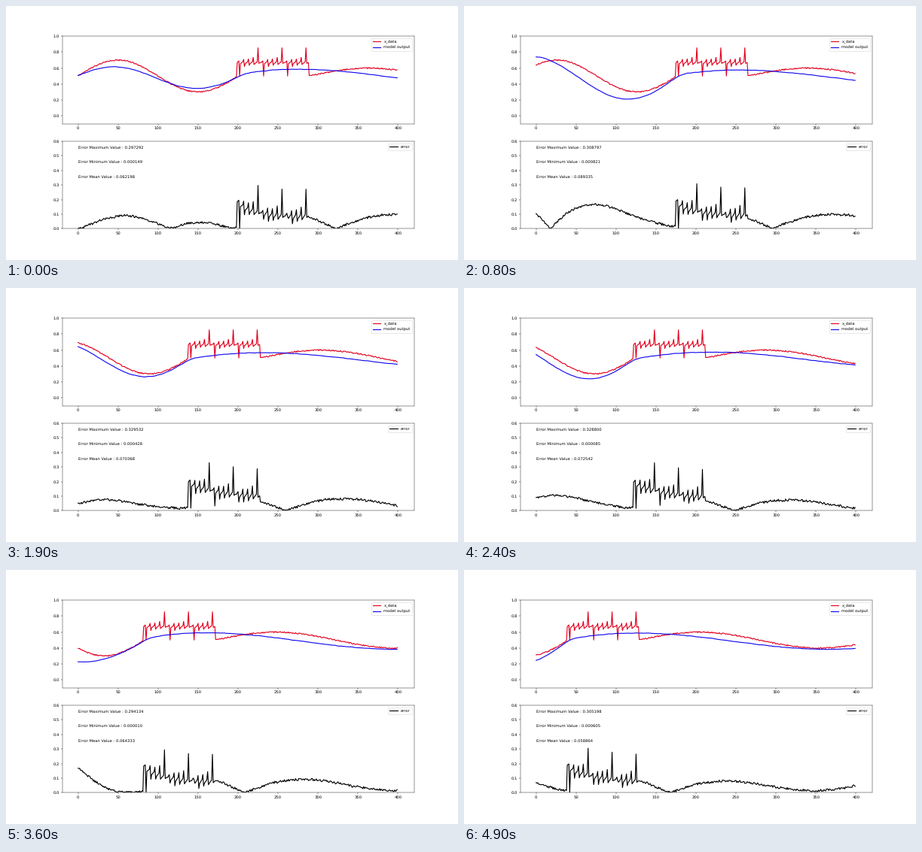
A matplotlib script for the animation above (5 s loop, 600 by 338 pixels).

```python
import numpy as np
import matplotlib.pyplot as plt
from matplotlib.animation import FuncAnimation

FRAMES, INTERVAL = 50, 100
WINDOW, LENGTH = 400, 564
WIDTH, HEIGHT, DPI = 600, 338, 37.5

plt.rcParams.update({"font.family": "DejaVu Sans", "font.size": 10.1,
                     "text.hinting": "none"})

# Key poses of the model: frame, wave swing, wave lead, hill centre, hill height
POSES = np.array([
    [0, .135, 2, 272, .587],
    [8, .270, 11, 275, .577],
    [19, .215, 5, 292, .568],
    [29, .265, 9, 300, .583],
    [36, .255, 21, 275, .592],
    [44, .265, 11, 285, .598],
    [49, .275, 11, 285, .588],
])


def make_signal():
    """Sine wave, a jagged burst, then a slower sine wave."""
    n = np.arange(LENGTH)
    signal = np.where(n < 289, 0.5 + 0.2 * np.sin(2 * np.pi * n / 200),
                      0.5 + 0.1 * np.sin(2 * np.pi * (n - 289) / 300))
    signal += np.random.default_rng(4).uniform(-0.008, 0.008, LENGTH)

    teeth = [(.50, .71), (.62, .715), (.635, .735), (.645, .855)]
    burst = [.67, .68, .69]
    for dip, peak in teeth:
        burst += [dip, *np.linspace(.655, .68, 4), peak]
    burst += [.66, .665, .67]
    signal[199:289] = np.tile(burst, 3)
    return signal


SIGNAL = make_signal()


def model_output(frame, n):
    """A warped sine wave that hands over to a broad hill near sample 200."""
    swing, lead, centre, height = (
        np.interp(frame, POSES[:, 0], column) for column in POSES.T[1:])
    warped = n + lead * (200 - n) / 60
    wave = 0.48 + swing * np.sin(2 * np.pi * warped / 200)

    floor = 0.384
    hill = floor + (height - floor) * (1 + np.cos(2 * np.pi * (n - centre) / 480)) / 2
    hill -= 0.04 * np.exp((200 - n) / 20)
    handover = 1 / (1 + np.exp((202 - n) / 6))

    jitter = np.random.default_rng(frame).normal(0, 0.003, len(n) + 4)
    jitter = np.convolve(jitter, np.ones(5) / 5, "valid")
    return wave + (hill - wave) * handover + jitter


fig, (ax_data, ax_error) = plt.subplots(
    2, 1, figsize=(WIDTH / DPI, HEIGHT / DPI), dpi=DPI)
fig.subplots_adjust(left=74.5 / WIDTH, right=541.5 / WIDTH,
                    bottom=1 - 296.4 / HEIGHT, top=1 - 40.3 / HEIGHT, hspace=0.2)

for ax, low, high, step in ((ax_data, -0.1, 1.0, 0.2), (ax_error, 0, 0.6, 0.1)):
    ax.set_xlim(-20, 420)
    ax.set_ylim(low, high)
    ax.set_xticks(range(0, 401, 50))
    ax.set_yticks(np.arange(0, high + step / 2, step))

x = np.arange(WINDOW)
data_line, = ax_data.plot(x, x * 0, color="#e2001e", lw=2.2, label="x_data")
model_line, = ax_data.plot(x, x * 0, color="#1208ee", lw=2.2, label="model output")
error_line, = ax_error.plot(x, x * 0, color="black", lw=2.2, label="error")
for ax in (ax_data, ax_error):
    ax.legend(loc="upper right")

STATS = {"Maximum": np.max, "Minimum": np.min, "Mean": np.mean}
texts = [ax_error.text(0, 0.55 - 0.1 * row, "") for row in range(len(STATS))]


def update(frame):
    offset = max(0, round(3.3 * frame - 1.9))
    data = SIGNAL[offset:offset + WINDOW]
    model = model_output(frame, x + offset)
    error = np.abs(data - model)
    for line, values in ((data_line, data), (model_line, model), (error_line, error)):
        line.set_ydata(values)
    for text, (label, stat) in zip(texts, STATS.items()):
        text.set_text(f"Error {label} Value : {stat(error):.6f}")
    return [data_line, model_line, error_line, *texts]


anim = FuncAnimation(fig, update, frames=FRAMES, interval=INTERVAL,
                     repeat=True, repeat_delay=0, blit=False)
plt.show()
```
